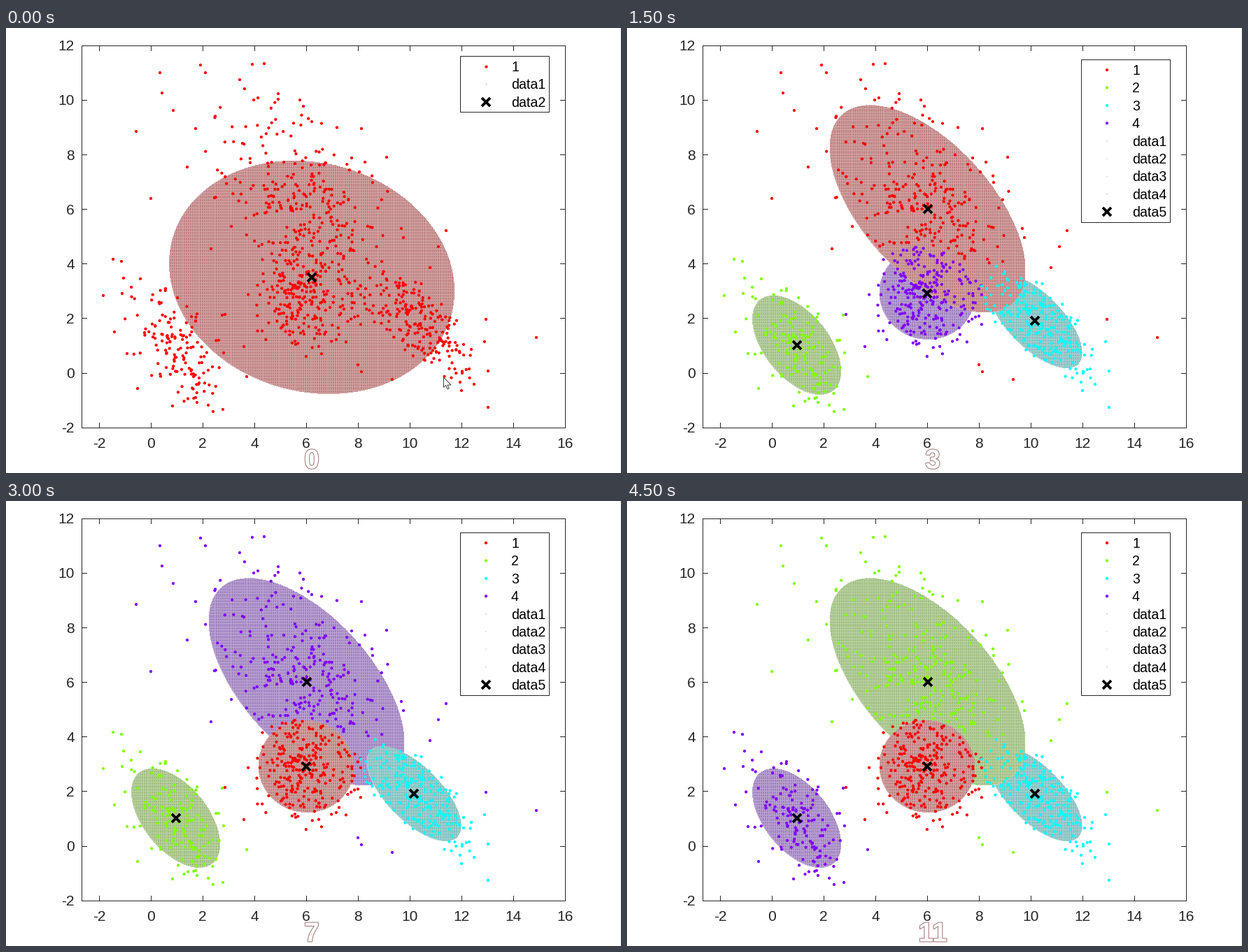
Write a matplotlib script that moves like this. It is 879 px wide and 637 px high and loops after 5000 ms.

```python
import colorsys

import matplotlib.pyplot as plt
import numpy as np
from matplotlib import patheffects
from matplotlib.animation import ArtistAnimation
from matplotlib.patches import Polygon, Rectangle

W, H = 879, 637
LEFT, RIGHT, TOP, BOTTOM = 107.5, 798.5, 24.5, 571.5
X0, Y0, UX, UY = 207.2, 493.5, 36.97, 39.05   # data origin and pixels per unit
REACH = 1.665                                 # ellipse radius in standard deviations
INK = "#262626"
LEGEND_TOP = {1: 39.5, 2: 50.5, 3: 70.5, 4: 44.5, 5: 32.5}

plt.rcParams["font.family"] = "Liberation Sans"
rng = np.random.default_rng(12)

# Isolated points around the clusters, in pixels
STRAYS = [
    (278, 53), (285, 64), (220, 64), (223, 93), (239, 118), (186, 148),
    (271, 144), (352, 52), (369, 51), (334, 74), (341, 87), (354, 103),
    (360, 100), (389, 94), (389, 102), (420, 103), (425, 112), (437, 134),
    (508, 144), (544, 185), (207, 244), (259, 199), (298, 243), (293, 316),
    (153, 331), (165, 334), (168, 358), (192, 359), (139, 383), (166, 380),
    (155, 435), (228, 373), (758, 443), (686, 417), (684, 449), (689, 491),
    (689, 543), (669, 510), (665, 460), (662, 488), (651, 519), (649, 507),
    (629, 290), (618, 313), (565, 287), (568, 300), (606, 343), (552, 503),
    (503, 482), (508, 492), (309, 411), (313, 410), (344, 499), (340, 456),
    (296, 549), (310, 546), (238, 541), (188, 516), (173, 466), (295, 485),
    (271, 529), (273, 536), (505, 206), (513, 192), (494, 186),
]

# Clusters: centre x, y, half width, half height, correlation, weight
WHOLE = (437, 357, 203.5, 166.5, 0.12, 1)
LOW = (349.5, 415.5, 182, 87.5, -0.5, 0.4)
SLOPE = (482.5, 327.5, 166.5, 174, 0.77, 0.6)
UPPER = (423, 254, 127.5, 139, 0.53, 0.32)
BAND = (501, 398.5, 152, 74, 0.55, 0.51)
SIDE = (242.5, 454, 63, 70.5, 0.53, 0.17)
CROWN = (351.5, 133.5, 114.5, 71.5, 0.25, 0.07)
MID = (425, 249, 113, 73, 0.31, 0.24)
MID_WIDE = (430, 252, 128, 92, 0.42, 0.26)
CORE = (431.5, 376, 70.5, 69, 0.04, 0.31)
TAIL = (578.5, 413.5, 75, 73.5, 0.65, 0.26)
CLOUD = (429.5, 259, 139.5, 148, 0.59, 0.32)
CLOUD_LOW = (431, 262, 139.5, 149.5, 0.59, 0.32)
DISC = (429, 380, 68, 65.5, 0.02, 0.31)
WEDGE = (583, 419, 67, 67.5, 0.68, 0.22)

STEPS = [
    (0, [WHOLE]),
    (1, [LOW, SLOPE]),
    (2, [UPPER, SIDE, BAND]),
    (3, [CLOUD, SIDE, WEDGE, DISC]),
    (4, [MID, SIDE, TAIL, CORE, CROWN]),
    (6, [TAIL, CROWN, MID_WIDE, CORE, SIDE]),
    (7, [DISC, SIDE, WEDGE, CLOUD]),
    (8, [CLOUD, WEDGE, DISC, SIDE]),
    (10, [WEDGE, SIDE, DISC, CLOUD_LOW]),
    (11, [DISC, CLOUD, WEDGE, SIDE]),
]


def distance(x, y, cluster):
    """Squared Mahalanobis distance, 1 on the ellipse's rim."""
    cx, cy, hx, hy, rho, _ = cluster
    u, v = (x - cx) / hx, (y - cy) / hy
    return (u * u - 2 * rho * u * v + v * v) / (1 - rho * rho)


def sample(cluster, n, limit=2.1):
    cx, cy, hx, hy, rho, _ = cluster
    z = rng.standard_normal((4 * n, 2))
    z = z[np.hypot(z[:, 0], z[:, 1]) < limit][:n]
    u = z[:, 0]
    v = rho * u + np.sqrt(1 - rho * rho) * z[:, 1]
    return np.column_stack([cx + hx / REACH * u, cy + hy / REACH * v])


def classify(pts, clusters):
    scores = []
    for c in clusters:
        area = c[2] * c[3] * np.sqrt(1 - c[4] ** 2)
        d = distance(pts[:, 0], pts[:, 1], c) * REACH ** 2
        scores.append(np.log(c[5] / area) - d / 2)
    return np.argmax(scores, axis=0)


def rim(cluster):
    cx, cy, hx, hy, rho, _ = cluster
    t = np.linspace(0, 2 * np.pi, 240)
    return np.column_stack([cx + hx * np.cos(t),
                            cy + hy * np.sin(t + np.arcsin(rho))])


def palette(k):
    return np.array([colorsys.hsv_to_rgb(i / k, 1, 1) for i in range(k)])


points = np.vstack([
    STRAYS,
    sample(SIDE, 135),
    sample(DISC, 275, 2.3),
    sample(WEDGE, 210, 2.2),
    sample(MID, 190),
    sample((372, 150, 95, 45, 0.1, 1), 32),
])
grid_x, grid_y = np.meshgrid(np.arange(65, 835, 1.533), np.arange(-27, 623, 1.305))

fig = plt.figure(figsize=(W / 72, H / 72), dpi=72, facecolor="white")
ax = fig.add_axes([0, 0, 1, 1])
ax.set_xlim(0, W)
ax.set_ylim(H, 0)
ax.axis("off")


def line(xs, ys, color=INK):
    ax.plot(xs, ys, color=color, lw=1, zorder=1)


def label(x, y, s, size, **kw):
    return ax.text(x, y, s, fontsize=size, va="baseline", **kw)


def draw_frame():
    ax.add_patch(Rectangle((LEFT, TOP), RIGHT - LEFT, BOTTOM - TOP,
                           fill=False, ec=INK, lw=1, zorder=1))
    for v in range(-2, 17, 2):
        x = X0 + v * UX
        if v < 16:
            line([x, x], [BOTTOM, BOTTOM - 7])
            line([x, x], [TOP, TOP + 7])
        label(x, 601, str(v), 21, ha="center", color=INK)
    for v in range(-2, 13, 2):
        y = Y0 - v * UY
        line([LEFT, LEFT + 7], [y, y])
        line([RIGHT, RIGHT - 7], [y, y])
        label(98, y + 7.5, str(v), 21, ha="right", color=INK)
    line([W - 1.5, W - 1.5], [0, H], "#e4e4e4")


def draw_cluster(cluster, color, z):
    shade = color / 4 + 0.5
    base = Polygon(rim(cluster), fc=shade * 0.7 + 0.3, lw=0,
                   antialiased=False, zorder=z)
    ax.add_patch(base)
    inside = distance(grid_x, grid_y, cluster) <= 1
    dots = ax.plot(grid_x[inside], grid_y[inside], ",", color=shade, zorder=z + 0.01)
    return [base, *dots]


def cross(x, y, z):
    return ax.plot(x, y, "x", color="black", ms=12.5, mew=3.8, ls="", zorder=z)


def draw_legend(k, colors):
    top, row = LEGEND_TOP[k], 25.4
    box = Rectangle((648.5, top), 127.5, row * (2 * k + 1) + 4.8,
                    fc="white", ec=INK, lw=1, zorder=6)
    ax.add_patch(box)
    ys = top + 15.5 + row * np.arange(2 * k + 1)
    out = [box,
           ax.scatter([686] * k, ys[:k], s=18, c=colors, lw=0, zorder=7),
           ax.scatter([686] * k, ys[k:-1], s=1.6, c=colors / 4 + 0.5, lw=0, zorder=7),
           *cross([686], [ys[-1]], 7)]
    for i, y in enumerate(ys):
        text = str(i + 1) if i < k else f"data{i - k + 1}"
        out.append(label(722, y + 7, text, 19.5, color="black", zorder=7))
    return out


def draw_pointer():
    shape = [(625.5, 500), (625.5, 514.5), (628.8, 511.5), (631, 517),
             (633.3, 516), (631, 511), (636, 511)]
    arrow = Polygon(shape, fc="white", ec="#444444", lw=1, zorder=8)
    ax.add_patch(arrow)
    return arrow


def draw_step(count, clusters):
    k = len(clusters)
    colors = palette(k)
    out = []
    for i, c in enumerate(clusters):
        out += draw_cluster(c, colors[i], 3 - 0.1 * i)
    out.append(ax.scatter(points[:, 0], points[:, 1], s=18, lw=0, zorder=4,
                          c=colors[classify(points, clusters)]))
    out += cross([c[0] for c in clusters], [c[1] for c in clusters], 5)
    out += draw_legend(k, colors)
    outline = patheffects.withStroke(linewidth=2, foreground="#a07474")
    out.append(label(437, 630.5, str(count), 39, ha="center", color="white",
                     weight="bold", path_effects=[outline], zorder=5))
    if count < 2:
        out.append(draw_pointer())
    return out


draw_frame()
frames = [draw_step(count, clusters) for count, clusters in STEPS]
anim = ArtistAnimation(fig, frames, interval=500, repeat=True, repeat_delay=0)
plt.show()
```
